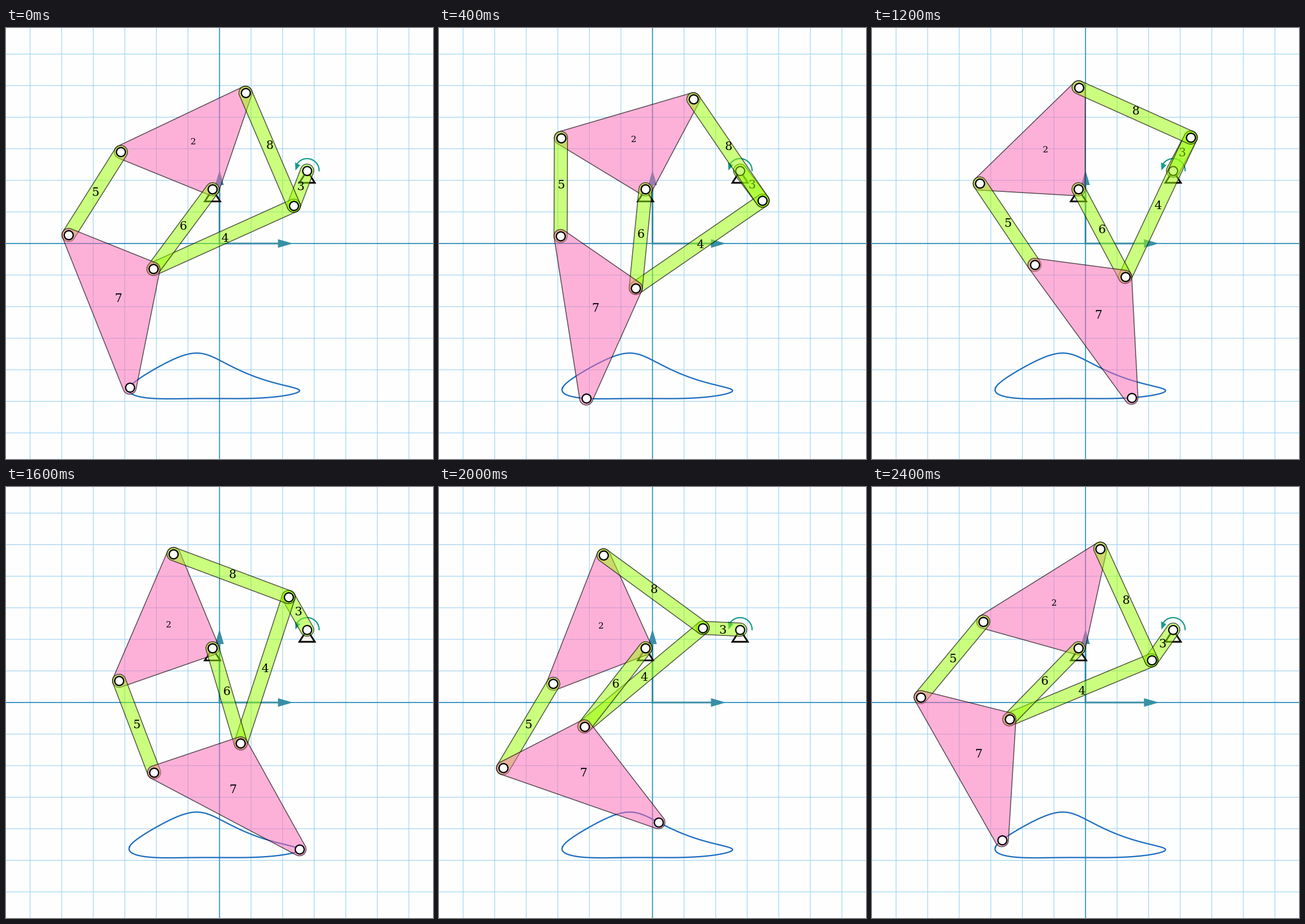
Animation of 745 by 752 pixels, one loop 2.5 s. Source, as a matplotlib script:

```python
import matplotlib.pyplot as plt
import numpy as np
from matplotlib.animation import FuncAnimation
from matplotlib.patches import Polygon

W, H, DPI = 745, 752, 64
PX = 72 / DPI                       # points per pixel
FRAMES, LOOP = 25, 2500

# Points are complex numbers x + iy, with y pointing down.
ORIGIN, CELL = complex(W, H) / 2, 55.08
CRANK, PIVOT = 525.3 + 248.9j, 360.3 + 281.4j
RADIUS = 11.5

PINK, LIME = (1, 0.4, 0.7, 0.5), (0.6, 1, 0, 0.5)
EDGE = (0, 0, 0, 0.65)
GRID, AXIS, ARROW = "#92cdef", "#1f86b6", "#388fa6"
TRACE, SPIN = "#1f6fc0", "#169b8a"

# link number: (joint names, fill)
LINKS = {
    2: ("PBQ", PINK),
    3: ("AC", LIME),
    4: ("CS", LIME),
    5: ("QR", LIME),
    6: ("BS", LIME),
    7: ("RST", PINK),
    8: ("CP", LIME),
}


def meet(p, rp, q, rq):
    """Intersection of two circles, on the clockwise side of p -> q."""
    gap = q - p
    dist = np.abs(gap)
    along = (dist**2 + rp**2 - rq**2) / (2 * dist)
    across = np.sqrt(np.maximum(rp**2 - along**2, 0))
    return p + gap / dist * (along + 1j * across)


def solve(turn):
    """Joint positions after the given part of a crank turn."""
    c = CRANK + 65.4 * np.exp(-1j * np.radians(249.2 + 360 * turn))
    p = meet(c, 214.2, PIVOT, 177.9)
    s = meet(PIVOT, 173.05, c, 268.6)
    q = meet(p, 240.7, PIVOT, 172.55)
    r = meet(q, 171.1, s, 159.4)
    t = meet(r, 286.85, s, 211.2)
    return dict(A=CRANK, B=PIVOT, C=c, P=p, Q=q, R=r, S=s, T=t)


def xy(z):
    z = np.atleast_1d(z)
    return np.column_stack([z.real, z.imag])


def rounded_hull(points):
    """Convex hull of the points, widened by RADIUS."""
    u = np.exp(1j * np.linspace(0, 2 * np.pi, 240, endpoint=False))
    reach = (u[:, None].conj() * points[None, :]).real
    return xy(points[reach.argmax(axis=1)] + RADIUS * u)


def label_spot(number, points):
    """Baseline centre: higher on steep links, further right on flat ones."""
    way = points[1] - points[0]
    steep = (way.imag / abs(way)) ** 2
    drop = 4 if number in (3, 4, 5, 7) else 0       # old-style figures
    spot = points.mean() + 2.5 * (1 - steep) + 1j * (5.2 - 7 * steep + drop)
    return spot.real, spot.imag


fig = plt.figure(figsize=(W / DPI, H / DPI), dpi=DPI, facecolor="#fefefe")
ax = fig.add_axes([0, 0, 1, 1])
ax.set_xlim(0, W)
ax.set_ylim(H, 0)
ax.axis("off")


def line(z, color, width, z_order):
    ax.plot(*xy(np.array(z)).T, color=color, lw=width * PX, snap=False,
            zorder=z_order)


def shape(points, z_order, **style):
    ax.add_patch(Polygon(xy(np.array(points)), zorder=z_order, snap=False,
                         **style))


def cross(step, color, width, z_order):
    """Full-stage vertical and horizontal line, some cells off the origin."""
    x, y = ORIGIN.real + step * CELL, ORIGIN.imag + step * CELL
    line([x, complex(x, H)], color, width, z_order)
    line([1j * y, complex(W, y)], color, width, z_order)


def draw_backdrop():
    for step in range(-6, 7):
        cross(step, GRID, 1, 0)
    cross(0, AXIS, 1.6, 0.1)

    for way in (1, -1j):
        line([ORIGIN, ORIGIN + 104 * way], ARROW, 3, 0.2)
        head = [ORIGIN + d * way for d in (128, 102 - 7.5j, 102 + 7.5j)]
        shape(head, 0.2, fc=ARROW, lw=0)

    line(solve(np.linspace(0, 1, 401))["T"], TRACE, 2.3, 0.3)

    for pin in (CRANK, PIVOT):
        shape([pin, pin + 13.5 + 21.2j, pin - 13.5 + 21.2j], 0.4,
              fc="#faf5ee", ec="black", lw=2.9 * PX, joinstyle="miter")

    sweep = np.radians(np.linspace(0, 150, 60))
    line(CRANK + 21 * np.exp(-1j * sweep), SPIN, 2.2, 0.5)
    shape([CRANK + d for d in (-20.3 - 0.3j, -21 - 14.5j, -12 - 9.5j)],
          0.5, fc=SPIN, lw=0)


def make_link(number, fill):
    body = ax.add_patch(Polygon(np.zeros((3, 2)), fc=fill, ec=EDGE,
                                lw=1.5 * PX, snap=False, zorder=number))
    label = ax.text(0, 0, str(number), family="DejaVu Serif",
                    size=(15 if number == 2 else 20.5) * PX, ha="center",
                    va="baseline", color="black", zorder=number + 0.1)
    joints, = ax.plot([], [], "o", ms=15.5 * PX, mfc="white", mec="black",
                      mew=2.2 * PX, snap=False, zorder=number + 0.2)
    return body, label, joints


draw_backdrop()
parts = {n: make_link(n, fill) for n, (_, fill) in LINKS.items()}


def update(frame):
    pose = solve(frame / FRAMES)
    artists = []
    for n, (names, _) in LINKS.items():
        points = np.array([pose[name] for name in names])
        body, label, joints = parts[n]
        body.set_xy(rounded_hull(points))
        label.set_position(label_spot(n, points))
        joints.set_data(*xy(points).T)
        artists += [body, label, joints]
    return artists


anim = FuncAnimation(fig, update, frames=FRAMES, interval=LOOP / FRAMES,
                     repeat=True, repeat_delay=0)
plt.show()
```
